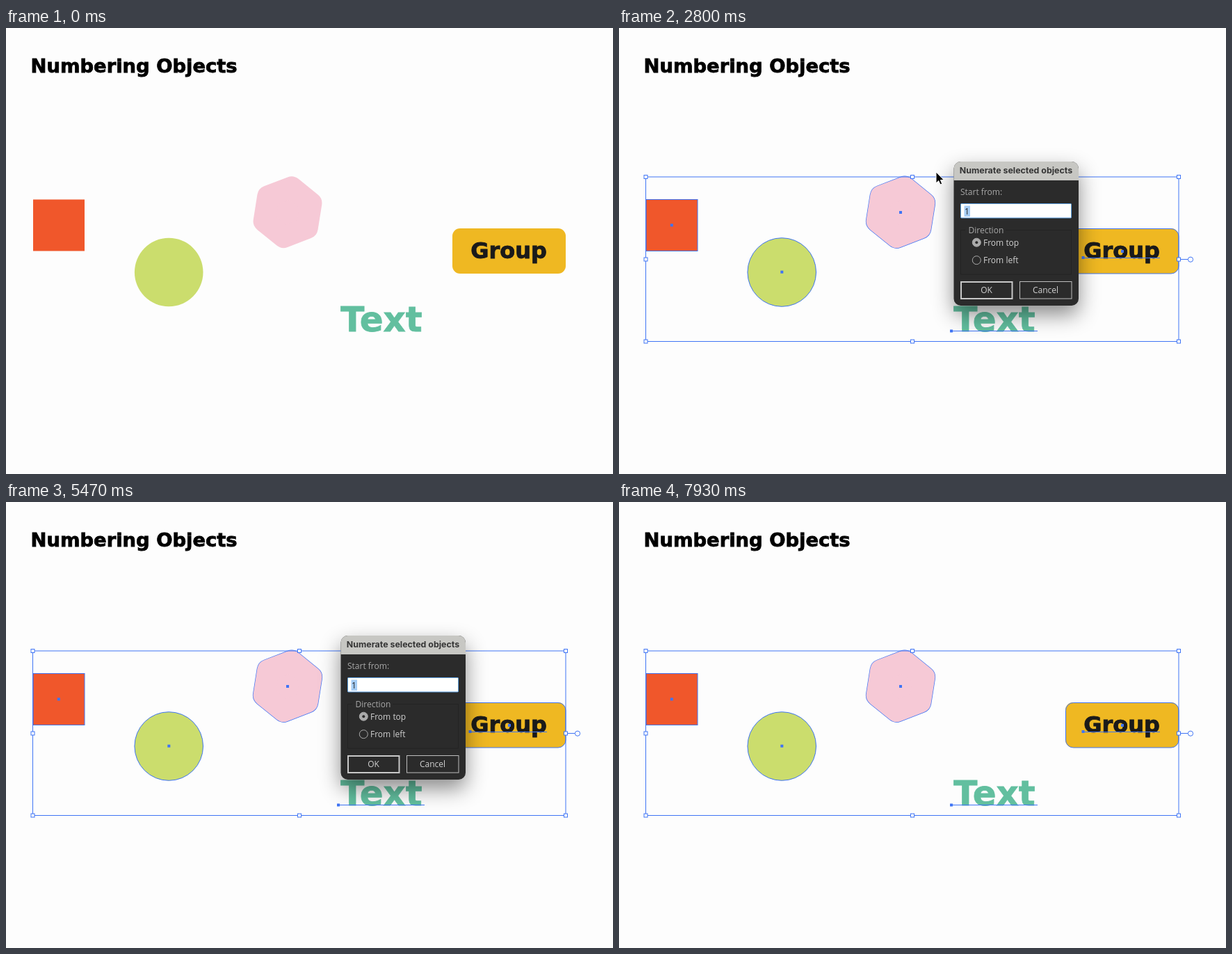
Write an HTML page that moves like this. It is 873x641 px and loops after 8000 ms.

```html
<!DOCTYPE html>
<html lang="en">
<head>
<meta charset="utf-8">
<title>Numbering Objects</title>
<style>
  html, body { margin: 0; width: 100%; height: 100%; overflow: hidden; background: #fdfdfd; }
  svg { display: block; width: 100%; height: 100%; }
  .wide { font-family: "DejaVu Sans", sans-serif; font-weight: 700; stroke-width: .8; }
  .ui { font: 12px "Open Sans", sans-serif; fill: #d0d0d0; }
  .muted { fill: #a8a8a8; }
  #numbers { font: 20px "Open Sans", sans-serif; }
  #selection { fill: none; stroke: #3f74f5; stroke-width: 1; }
  #selection .mark { fill: #3f74f5; stroke: none; }
  #selection .handle { fill: #fff; }
  #shadow { filter: drop-shadow(0 13px 15px rgba(0, 0, 0, .45)); }
</style>
</head>
<body>
<svg viewBox="0 0 873 641">
  <defs>
    <polygon id="hexagon" stroke-linejoin="round"/>
  </defs>
  <rect width="873" height="641" fill="#fdfdfd"/>
  <text class="wide" x="35.5" y="64" font-size="27.4" stroke="#000">Numbering Objects</text>

  <rect x="39" y="246.5" width="74" height="74" fill="#f0572b"/>
  <circle cx="234.2" cy="351" r="49.3" fill="#cbdd6d"/>
  <use id="hexOutline" href="#hexagon" stroke="#3f74f5" stroke-width="33"/>
  <use href="#hexagon" fill="#f6c9d6" stroke="#f6c9d6" stroke-width="31.6"/>
  <rect x="642" y="288" width="163" height="65" rx="11" fill="#efb822"/>
  <text class="wide" x="723" y="331" font-size="32" text-anchor="middle" fill="#1a1a1a" stroke="#1a1a1a">Group</text>
  <text class="wide" x="540" y="436" font-size="50" text-anchor="middle" fill="#62bf9f" stroke="#62bf9f">Text</text>

  <g id="numbers"></g>

  <g id="selection">
    <rect x="39" y="246.5" width="74" height="74"/>
    <circle cx="234.2" cy="351" r="49.3"/>
    <rect x="642.5" y="288.5" width="162.5" height="64.5" rx="11"/>
    <path d="M478 435.5H602M667 330.5H778M805 332.5H818"/>
    <rect x="38.5" y="214" width="766.5" height="236.5"/>
    <circle class="handle" cx="822" cy="332.7" r="3.6"/>
  </g>

  <rect id="marquee" fill="none" stroke="#8a8a8a"/>

  <g id="dialog">
    <rect id="shadow" x="481.5" y="192" width="179.5" height="207" rx="10" fill="#2b2b2b"/>
    <path d="M481.5 219V202a10 10 0 0 1 10-10H651a10 10 0 0 1 10 10V219Z" fill="#c7c7c3"/>
    <text x="571" y="209.3" text-anchor="middle" font-family="Inter, sans-serif" font-weight="700" font-size="12.4" fill="#353535">Numerate selected objects</text>
    <text class="ui muted" x="491" y="240">Start from:</text>
    <rect id="field" x="491.5" y="252.5" width="159" height="20.5" rx="1"/>
    <rect id="highlight" x="496.5" y="255.5" width="8.5" height="15.5" fill="#a6cdf5"/>
    <text id="value" class="ui" x="497" y="267.5">1</text>
    <path d="M498 290.5H491.5V354H650.5V290.5H556" fill="none" stroke="#232323"/>
    <text class="ui muted" x="502.5" y="294.5">Direction</text>
    <g class="radio"><circle cx="514.3" cy="308.2" r="6"/><circle cx="514.3" cy="308.2" r="2" fill="#2b2b2b"/></g>
    <text class="ui" x="524" y="312.5">From top</text>
    <g class="radio"><circle cx="514.3" cy="333.7" r="6"/><circle cx="514.3" cy="333.7" r="2" fill="#2b2b2b"/></g>
    <text class="ui" x="524" y="338">From left</text>
    <rect id="ok" x="492" y="365" width="73.5" height="24"/>
    <text class="ui" x="528.5" y="381.3" text-anchor="middle">OK</text>
    <rect x="576.5" y="364.5" width="74.5" height="24.5" fill="none" stroke="#bdbdbd"/>
    <text class="ui" x="613.5" y="381.3" text-anchor="middle">Cancel</text>
  </g>

  <g id="cursor">
    <path id="systemArrow" d="M0 0V16L3.7 12.6 6 18 8.7 16.9 6.4 11.6H11.3Z" stroke="#fff"/>
    <path id="toolArrow" d="M0 0V19L4.6 13.4 11.5 12.4Z"/>
  </g>
</svg>
<script>
const LOOP = 8000;
const el = id => document.getElementById(id);
const clamp = v => Math.min(1, Math.max(0, v));
const show = (node, on) => { node.style.display = on ? "" : "none"; };
const attrs = (node, values) => {
  for (const key in values) node.setAttribute(key, values[key]);
  return node;
};
const add = (parent, tag, values) => parent.appendChild(
  attrs(document.createElementNS("http://www.w3.org/2000/svg", tag), values));

// Six corners; a wide round stroke gives the soft edges.
el("hexagon").setAttribute("points", Array.from({ length: 6 }, (_, i) => {
  const angle = (9 + 60 * i) * Math.PI / 180;
  return [405 + 36 * Math.sin(angle), 264.7 - 36 * Math.cos(angle)];
}).join(" "));

const square = (x, y, size, cls) => add(el("selection"), "rect",
  { x: x - size / 2, y: y - size / 2, width: size, height: size, class: cls });
[[38.5, 214], [422, 214], [805, 214], [38.5, 332.5], [805, 332.5],
 [38.5, 450.5], [422, 450.5], [805, 450.5]].forEach(([x, y]) => square(x, y, 5, "handle"));
[[75.8, 283.4], [234.3, 350.7], [405, 265], [724, 321], [478, 435.5], [667.5, 330]]
  .forEach(([x, y]) => square(x, y, 4, "mark"));

// Label anchors with their rank from the top and from the left.
const labels = [
  { x: 38.5, y: 225, top: 2, left: 1 },
  { x: 184.5, y: 280, top: 4, left: 2 },
  { x: 355.5, y: 193, top: 1, left: 3 },
  { x: 478, y: 373.5, top: 5, left: 4 },
  { x: 642, y: 266.5, top: 3, left: 5 }
].map(label => ({ ...label, node: add(el("numbers"), "text", { x: label.x, y: label.y }) }));

const dragStart = [813, 56];
const paths = [
  [[600, ...dragStart], [1270, 17, 566], [1500, 17, 566]],
  [[2600, 432, 168], [2800, 456, 207], [3100, 530, 375], [4000, 530, 375], [4400, 853, 435], [4900, 853, 435]],
  [[5530, 440, 210], [5770, 512, 331], [5880, 512, 331], [6150, 541, 383], [7070, 541, 383], [7400, 600, 483], [7900, 600, 483]]
];

const runs = [
  { open: 2270, press: 3190, fade: 3250, numbers: 3500, deselect: 4440, reset: 4730, order: "top", pickLeft: Infinity },
  { open: 5400, press: 6230, fade: 6300, numbers: 6530, deselect: 7440, reset: 7700, order: "left", pickLeft: 5820 }
];

function pointerAt(t) {
  const path = paths.find(p => t >= p[0][0] && t < p.at(-1)[0]);
  if (!path) return null;
  const i = path.findIndex(key => key[0] > t);
  const [t0, x0, y0] = path[i - 1], [t1, x1, y1] = path[i];
  const u = (t - t0) / (t1 - t0), ease = u * u * (3 - 2 * u);
  return [x0 + (x1 - x0) * ease, y0 + (y1 - y0) * ease];
}

function drawDialog(opacity, pressed, leftPicked) {
  show(el("dialog"), opacity > 0);
  el("dialog").setAttribute("opacity", opacity);
  attrs(el("field"), pressed ? { fill: "#202020", stroke: "#292929" } : { fill: "#fff", stroke: "#5a9de0" });
  el("value").style.fill = pressed ? "#d0d0d0" : "#222";
  show(el("highlight"), !pressed);
  attrs(el("ok"), pressed
    ? { fill: "#2f8ce6", stroke: "#2f8ce6", "stroke-width": 2 }
    : { fill: "none", stroke: "#c8c8c8", "stroke-width": 2 });
  document.querySelectorAll(".radio").forEach((radio, i) => {
    const on = leftPicked === (i === 1);
    attrs(radio.firstElementChild, { fill: on ? "#aaa" : "none", stroke: "#aaa" });
    show(radio.lastElementChild, on);
  });
}

function draw(t) {
  const run = t < 5000 ? runs[0] : runs[1];
  const selected = t >= 1330 && !(t >= run.deselect && t < run.reset);
  show(el("selection"), selected);
  show(el("hexOutline"), selected);

  show(el("numbers"), t >= run.numbers && t < run.reset);
  labels.forEach(label => { label.node.textContent = label[run.order]; });

  const opacity = t < run.open ? 0 : 1 - clamp((t - run.fade) / 200);
  drawDialog(opacity, t >= run.press, t >= run.pickLeft);

  const pointer = pointerAt(t);
  show(el("cursor"), pointer);
  show(el("marquee"), pointer && t < 1330);
  if (!pointer) return;
  const [x, y] = pointer;
  el("cursor").setAttribute("transform", `translate(${x} ${y})`);
  show(el("systemArrow"), opacity > 0);
  show(el("toolArrow"), opacity === 0);
  if (t < 1330) attrs(el("marquee"),
    { x, y: dragStart[1], width: dragStart[0] - x, height: y - dragStart[1] });
}

const start = performance.now();
(function frame() {
  draw((performance.now() - start) % LOOP);
  requestAnimationFrame(frame);
})();
</script>
</body>
</html>
```
